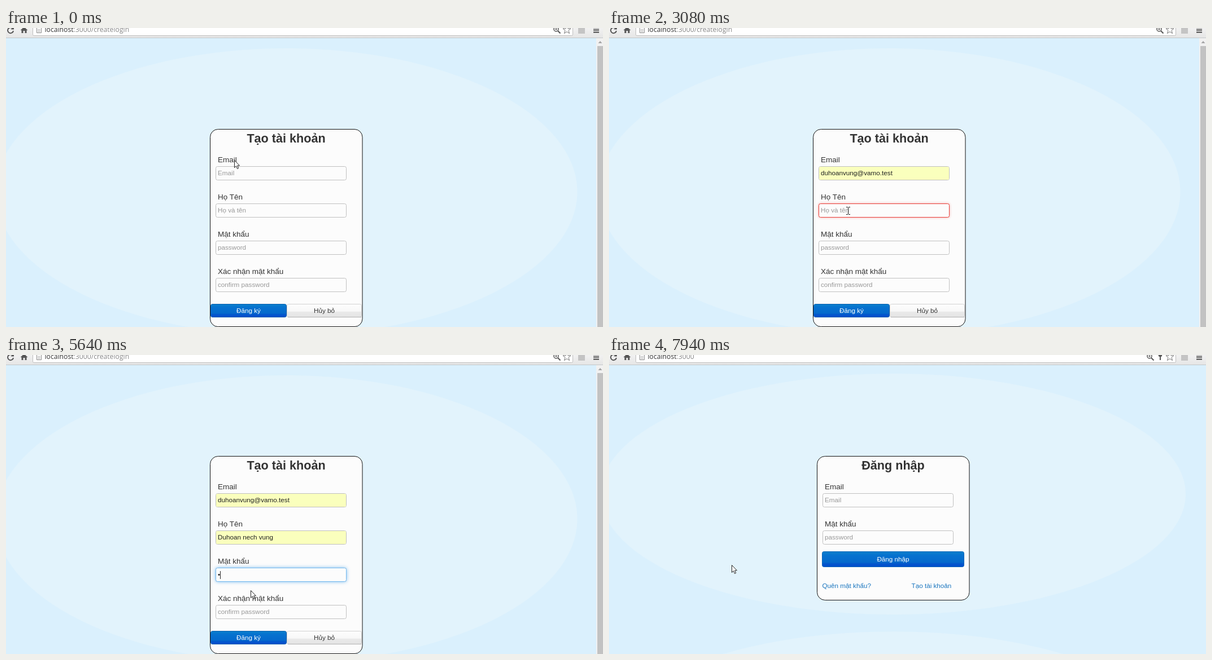
An HTML page for the animation above (8000 ms loop, 1057 px wide and 530 px high).

```html
<!DOCTYPE html>
<html lang="vi">
<head>
<meta charset="utf-8">
<title>Tạo tài khoản</title>
<style>
html, body { margin: 0; width: 100%; height: 100%; overflow: hidden; background: #daf0fd; }
svg { display: block; width: 1057px; height: 530px; }
text { font: 11.7px "Liberation Sans", Arial, sans-serif; fill: #333; white-space: pre; }
.title { font-size: 21.6px; font-weight: bold; text-anchor: middle; }
.label { font-size: 13.5px; }
.hint { fill: #999; }
.value { fill: #222; }
.btn { text-anchor: middle; }
.white { fill: #fff; }
.link { fill: #1a76bf; }
.url { font: 12.2px "Open Sans", "Noto Sans", sans-serif; }
.item { font: 9.35px "Open Sans", "Noto Sans", sans-serif; fill: #222; }
.red { filter: drop-shadow(0 0 2px #f4a5a2); }
.blue { filter: drop-shadow(0 0 3px rgba(82,168,236,.75)); }
</style>
</head>
<body>
<svg id="stage" viewBox="0 0 1057 530">
  <defs>
    <linearGradient id="primary" x2="0" y2="1">
      <stop offset="0" stop-color="#0a80cc"/>
      <stop offset=".25" stop-color="#0672cf"/>
      <stop offset=".7" stop-color="#0469cc"/>
      <stop offset=".8" stop-color="#0256cc"/>
      <stop offset="1" stop-color="#024ccc"/>
    </linearGradient>
    <linearGradient id="plain" x2="0" y2="1">
      <stop offset="0" stop-color="#fdfdfd"/>
      <stop offset=".55" stop-color="#f8f8f8"/>
      <stop offset=".6" stop-color="#e9e9e9"/>
      <stop offset="1" stop-color="#e4e4e4"/>
    </linearGradient>
    <linearGradient id="chrome" x2="0" y2="1">
      <stop offset="0" stop-color="#f1f1f1"/>
      <stop offset="1" stop-color="#e6e6e6"/>
    </linearGradient>
  </defs>
</svg>
<script>
const LOOP = 8000, SWAP = 7700;
const EMAIL = 'duhoanvung@vamo.test', NAME = 'Duhoan nech vung';
const stage = document.getElementById('stage');

function add(parent, tag, attrs = {}, text) {
  const el = document.createElementNS('http://www.w3.org/2000/svg', tag);
  for (const key in attrs) el.setAttribute(key, attrs[key]);
  if (text) el.textContent = text;
  parent.appendChild(el);
  return el;
}
const group = parent => add(parent, 'g');
const rect = (p, x, y, width, height, fill, more) =>
  add(p, 'rect', { x, y, width, height, fill, ...more });
const path = (p, d, fill, more) => add(p, 'path', { d, fill, ...more });
const label = (p, x, y, cls, text) => add(p, 'text', { x, y, class: cls }, text);
const show = (el, on) => el.setAttribute('visibility', on ? 'inherit' : 'hidden');
const within = (t, spans) => spans.some(([a, b]) => t >= a && t < b);

// Last row of a step table whose time has been reached
function at(table, t) {
  let row = table[0];
  for (const r of table) if (r[0] <= t) row = r;
  return row;
}

function backdrop(p, cx, cy, rx, ry) {
  rect(p, 0, 0, 1057, 530, '#daf0fd');
  for (const y of [cy, cy + ry / .467])
    add(p, 'ellipse', { cx, cy: y, rx, ry, fill: '#e2f3fc' });
}

function card(p, x, height, title) {
  rect(p, x + .5, 179.5, 269.5, height, '#fcfcfc', { rx: 14, stroke: '#111' });
  label(p, x + 135, 203, 'title', title);
}

function button(p, x, y, w, h, fill, edge, text, cls) {
  const box = rect(p, x + .5, y + .5, w - 1, h - 1, fill, { rx: 3, stroke: edge });
  label(p, x + w / 2, y + h / 2 + 4, 'btn ' + cls, text);
  return box;
}

function input(p, x, y, caption, hint) {
  const frame = { rx: 3, stroke: '#c0c0c0' };
  label(p, x + 4, y - 7, 'label', caption);
  const ring = (cls, stroke) =>
    rect(p, x + .5, y + .5, 231, 24, '#fcfcfc', { rx: 3, stroke, class: cls, opacity: 0 });
  const box = rect(p, x + .5, y + .5, 231, 24, '#fcfcfc', frame);
  const red = ring('red', '#e9403b'), blue = ring('blue', '#75b9ee');
  const fill = rect(p, x + 1, y + 1, 230, 23, '#faffbd', { rx: 2, visibility: 'hidden' });
  const ghost = label(p, x + 4, y + 16, 'hint', hint);
  const sel = rect(p, 0, y + 6, 0, 14, '#3390ff', { visibility: 'hidden' });
  const text = label(p, x + 4, y + 16, 'value');
  const head = add(text, 'tspan'), tail = add(text, 'tspan', { class: 'white' });
  const caret = rect(p, x + 4, y + 6, 1, 14, '#222', { visibility: 'hidden' });
  return { x, box, red, blue, fill, ghost, sel, text, head, tail, caret };
}

function menu(p, y, items) {
  const g = group(p), h = items.length * 20;
  rect(g, 370.5, y + .5, 233, h, '#fff', { stroke: '#b4b4bc' });
  const mark = rect(g, 371, y + 1, 232, 19.5, '#c9c9c9');
  items.forEach((s, i) => label(g, 373.5, y + 14 + i * 19.7, 'item', s));
  return { g, mark };
}

// Sign-up page
const signup = group(stage);
backdrop(signup, 496.5, 290.5, 515, 254.5);
card(signup, 361, 350, 'Tạo tài khoản');
const main = button(signup, 362, 489, 135, 24, 'url(#primary)', '#0b5fae', 'Đăng ký', 'white');
button(signup, 497, 489, 133, 24, 'url(#plain)', '#d2d2d2', 'Hủy bỏ', '');
path(signup, 'M499 512.5H629', 'none', { stroke: '#b3b3b3' });
rect(signup, 1045, 18, 12, 512, '#f1f1f1');
rect(signup, 1047, 32, 10, 498, '#c2c2c2');
path(signup, 'M1048.5 27l3.5-4 3.5 4z', '#a5a5a5');

// glow: time, red, blue.  text: time, typed, suggested rest, filled
const fields = [
  {
    ui: input(signup, 371, 245, 'Email', 'Email'),
    glow: [[0, 0, 0], [430, .5, 0], [550, 1, 0], [1930, .5, .5], [2050, 0, 1],
      [2310, 0, .6], [2430, 0, .25], [2580, 0, 0]],
    text: [[0, ''], [1100, 'd'], [1390, 'du'], [1530, 'du', EMAIL.slice(2), 1], [1930, EMAIL, '', 1]],
    caret: [[430, 960], [1100, 1530], [2050, 2310]]
  },
  {
    ui: input(signup, 371, 311, 'Họ Tên', 'Họ và tên'),
    glow: [[0, 0, 0], [2310, .3, 0], [2430, .7, 0], [2580, 1, 0], [3610, .7, .2],
      [3760, .3, .7], [3890, 0, 1], [4970, 0, .45], [5100, 0, 0]],
    text: [[0, ''], [3610, 'D'], [4030, 'D', NAME.slice(1), 1], [4180, NAME, '', 1]],
    caret: [[2430, 3080], [3610, 4030], [4180, 4540]]
  },
  {
    ui: input(signup, 371, 377, 'Mật khẩu', 'password'),
    glow: [[0, 0, 0], [4970, .7, 0], [5100, 1, 0], [5390, .5, .5], [5520, 0, 1],
      [5900, 0, .5], [6020, 0, 0]],
    text: [[0, ''], [5390, '•']],
    caret: [[4970, 5780]]
  },
  {
    ui: input(signup, 371, 443, 'Xác nhận mật khẩu', 'confirm password'),
    glow: [[0, 0, 0], [5900, .5, 0], [6020, 1, 0], [6140, .5, .5], [6260, 0, 1],
      [7190, 0, .5], [7310, 0, 0]],
    text: [[0, ''], [6140, '•']],
    caret: [[5900, 6500], [7040, 7190]]
  }
];
const menus = [
  { ui: menu(signup, 270, [EMAIL, 'duhoannechvung286@vamo.test']), from: 1100, hover: 1530, to: 1930 },
  { ui: menu(signup, 336, [NAME, 'Duhoan nech', 'Duhoan vung']), from: 3610, hover: 4030, to: 4180 }
];

// Login page
const login = group(stage);
backdrop(login, 503, 246.5, 518, 213.5);
card(login, 368, 255, 'Đăng nhập');
input(login, 378, 245, 'Email', 'Email');
input(login, 378, 311, 'Mật khẩu', 'password');
button(login, 377, 348, 252, 28, 'url(#primary)', '#0b66b8', 'Đăng nhập', 'white');
label(login, 377.5, 413, 'link', 'Quên mật khẩu?');
label(login, 535.5, 413, 'link', 'Tạo tài khoản');

// Browser bar
const bar = group(stage), ink = '#555';
const line = (p, d, w, stroke = ink) => path(p, d, 'none', { stroke, 'stroke-width': w });
rect(bar, 0, 0, 1057, 17, 'url(#chrome)');
rect(bar, 0, 17, 1057, 1, '#c3c7c9');
rect(bar, 47.5, -10, 956, 23.5, '#fff', { rx: 2, stroke: '#bdbdbd' });
const reload = group(bar);
line(reload, 'M11.5 .5A5 5 0 1 0 13 5', 2);
path(reload, 'M8.5 2.5H14V-3z', ink);
const stop = line(bar, 'M4 -1l9 9M13 -1l-9 9', 2.2);
path(bar, 'M25.5 4l6.5-6 6.5 6h-2v5h-3V5h-3v4h-3V4z', ink);
path(bar, 'M54.5 -3.5h5l3 3v9h-8z', '#fff', { stroke: '#8a8a8a' });
line(bar, 'M56 2.5h5M56 4.5h5M56 6.5h5', .8, '#aaa');
const url = label(bar, 68.5, 7.3, 'url');
add(url, 'tspan', {}, 'localhost');
const rest = add(url, 'tspan', { fill: '#888' });
const zoom = group(bar);
add(zoom, 'circle', { cx: 974, cy: 2, r: 4, fill: 'none', stroke: ink, 'stroke-width': 1.5 });
line(zoom, 'M977 5l4.5 4.5', 2);
line(zoom, 'M972 2h4M974 0v4', 1);
const key = group(bar);
add(key, 'circle', { cx: 976, cy: 0, r: 3.3, fill: ink });
rect(key, 975, 2, 2, 7, ink);
path(bar, 'M993 -4l2 5h5l-4 3.4 1.6 5.2-4.6-3-4.6 3 1.6-5.2-4-3.4h5z', '#fff', { stroke: '#777' });
rect(bar, 1013, -2, 12, 12, '#c4c4c4');
line(bar, 'M1040 -.5h10M1040 3.5h10M1040 7.5h10', 2, '#444');

// Pointer: time, x, y, shape (a arrow, i text beam, - hidden)
const track = [
  [0, 404, 234, 'a'], [150, 404, 240, 'a'], [300, 408, 254, 'i'], [430, 411, 256, 'i'],
  [1390, 0, 0, '-'], [1530, 416, 282, 'a'], [1650, 418, 285, 'a'], [1930, 420, 288, 'a'],
  [2050, 421, 300, 'a'], [2170, 422, 320, 'i'], [2310, 423, 324, 'i'], [3610, 0, 0, '-'],
  [4030, 421, 344, 'a'], [4300, 422, 348, 'a'], [4420, 423, 352, 'a'], [4540, 424, 356, 'a'],
  [4690, 424, 365, 'a'], [4810, 424, 374, 'a'], [4970, 427, 384, 'i'], [5100, 429, 379, 'i'],
  [5240, 430, 379, 'i'], [5390, 0, 0, '-'], [5640, 433, 417, 'a'], [5780, 435, 452, 'i'],
  [6140, 0, 0, '-'], [6260, 436, 437, 'a'], [6380, 437, 435, 'a'], [6500, 455, 436, 'a'],
  [6660, 466, 468, 'a'], [6800, 468, 484, 'a'], [6920, 468, 498, 'a'], [7040, 466, 501, 'a'],
  [7190, 380, 468, 'a'], [7310, 252, 429, 'a'], [7460, 240, 416, 'a'], [7580, 231, 404, 'a'],
  [7700, 225, 393, 'a'], [7820, 220, 382, 'a'], [7940, 217, 372, 'a']
];
const pointer = group(stage);
const arrow = path(pointer, 'M.5 .5v13l3-2.8 2 4.8 2.2-1-2-4.6h3.8z', '#fff', { stroke: '#222' });
const beam = line(pointer, 'M-3 -6.5h2.5l1 1 1-1H4M-3 6.5h2.5l1-1 1 1H4M.5 -6v12', 1, '#111');

function drawField({ ui, glow, text, caret }, t) {
  const [, red, blue] = at(glow, t);
  const [, typed, more = '', filled] = at(text, t);
  ui.red.setAttribute('opacity', red);
  ui.blue.setAttribute('opacity', blue);
  show(ui.fill, filled);
  show(ui.ghost, !typed);
  if (ui.head.textContent !== typed) ui.head.textContent = typed;
  if (ui.tail.textContent !== more) ui.tail.textContent = more;
  const end = ui.x + 4 + (typed ? ui.head.getComputedTextLength() : 0);
  show(ui.sel, more);
  if (more) {
    ui.sel.setAttribute('x', end);
    ui.sel.setAttribute('width', ui.tail.getComputedTextLength());
  }
  ui.caret.setAttribute('x', Math.round(end));
  show(ui.caret, within(t, caret));
}

function draw(t) {
  const loaded = t >= SWAP, loading = t >= 7190 && !loaded;
  show(signup, !loaded);
  show(login, loaded);
  show(reload, !loading);
  show(stop, loading);
  show(key, loaded);
  zoom.setAttribute('transform', `translate(${loaded ? -17 : 0})`);
  rest.textContent = loaded ? ':3000' : ':3000/createlogin';
  main.setAttribute('fill', within(t, [[6920, 7190]]) ? '#0250cc' : 'url(#primary)');
  main.setAttribute('stroke', t >= 7040 ? '#2f8fdc' : '#0b5fae');
  fields.forEach(f => drawField(f, t));
  for (const { ui, from, hover, to } of menus) {
    show(ui.g, t >= from && t < to);
    show(ui.mark, t >= hover);
  }
  const [, x, y, shape] = at(track, t);
  pointer.setAttribute('transform', `translate(${x} ${y})`);
  show(arrow, shape === 'a');
  show(beam, shape === 'i');
}

const start = performance.now();
function tick() {
  draw((performance.now() - start) % LOOP);
  requestAnimationFrame(tick);
}
tick();
</script>
</body>
</html>
```
